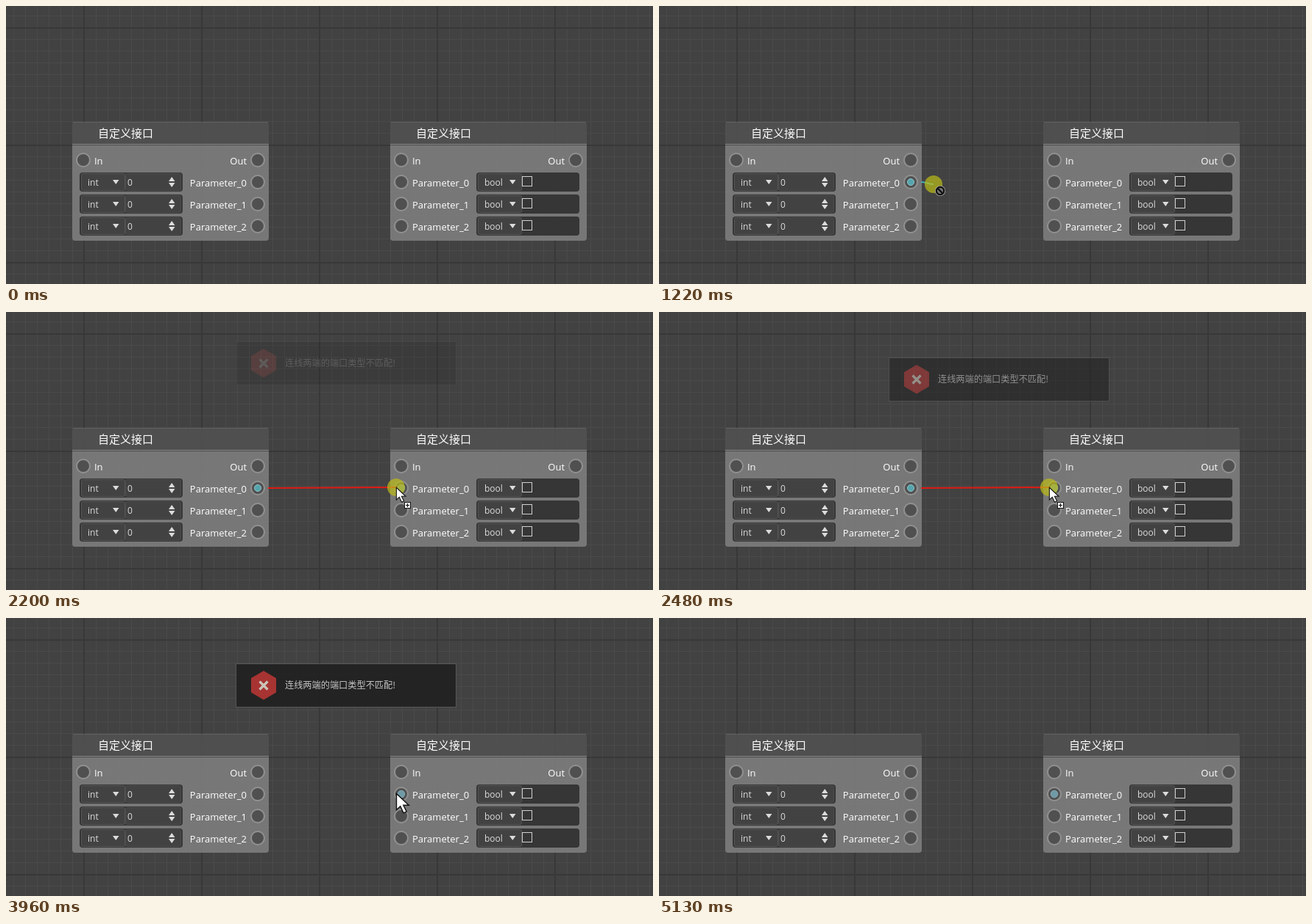
Write an HTML page that moves like this. It is 879 px wide and 379 px high and loops after 5.72 s.

```html
<!DOCTYPE html>
<html lang="zh">
<head>
<meta charset="utf-8">
<style>
html, body { margin: 0; width: 100%; height: 100%; overflow: hidden; background: #424242; }
svg { display: block; width: 879px; height: 379px; }
text { font-family: "Open Sans", "Noto Sans", "Noto Sans CJK SC", "Noto Sans CJK", sans-serif; font-size: 13px; fill: #fff; }
.cjk { font-family: "Noto Sans CJK SC", "Noto Sans CJK", sans-serif; }
.small { font-size: 12px; fill: #dcdcdc; }
</style>
</head>
<body>
<svg id="stage" viewBox="0 0 879 379" xmlns="http://www.w3.org/2000/svg"></svg>
<script>
const LOOP = 5720, STEP = 70;
const PRESS = 1010, MISMATCH = 2060, RELEASE = 2900, FADE = 3925, LEAVE = 4710;
const stage = document.getElementById('stage');

function add(parent, tag, attrs, text) {
  const el = document.createElementNS('http://www.w3.org/2000/svg', tag);
  for (const key in attrs) el.setAttribute(key, attrs[key]);
  if (text) el.textContent = text;
  parent.appendChild(el);
  return el;
}
const rect = (p, x, y, width, height, fill, more) => add(p, 'rect', { x, y, width, height, fill, ...more });
const path = (p, d, fill, more) => add(p, 'path', { d, fill, ...more });
const label = (p, x, y, s, more) => add(p, 'text', { x, y, ...more }, s);
const circle = (p, cx, cy, r, fill, more) => add(p, 'circle', { cx, cy, r, fill, ...more });
const show = (el, on) => el.setAttribute('visibility', on ? 'visible' : 'hidden');
const move = (el, x, y) => el.setAttribute('transform', `translate(${Math.round(x)} ${Math.round(y)})`);

function drawGrid() {
  rect(stage, 0, 0, 879, 379, '#424242');
  for (let x = 10; x < 879; x += 16) rect(stage, x, 0, 1, 379, '#4a4a4a');
  for (let y = 13; y < 379; y += 16) rect(stage, 0, y, 879, 1, '#4a4a4a');
  for (let x = 105; x < 879; x += 160) rect(stage, x, 0, 2, 379, '#383838');
  for (let y = 29; y < 379; y += 160) rect(stage, 0, y, 879, 2, '#383838');
}

function port(p, x, y) {
  circle(p, x, y, 9, '#505050', { stroke: '#919191', 'stroke-width': 2 });
}

function field(p, x, y, type) {
  rect(p, x, y, 140, 26, '#363636', { rx: 4 });
  rect(p, x + 2.5, y + 1.5, 59, 23, '#424242', { rx: 2, stroke: '#555' });
  label(p, x + 11, y + 18, type, { class: 'small' });
  path(p, `M${x + 45} ${y + 10}h8.5l-4.25 6z`, '#dcdcdc');
  if (type === 'int') {
    rect(p, x + 62.5, y + 1.5, 75, 23, '#424242', { rx: 2, stroke: '#4c4c4c' });
    label(p, x + 65, y + 18, '0', { class: 'small' });
    path(p, `M${x + 121} ${y + 12}h8.5l-4.25 -6zM${x + 121} ${y + 14}h8.5l-4.25 6z`, '#dcdcdc');
  } else {
    rect(p, x + 62.5, y + 5.5, 13, 13, 'none', { stroke: '#d0d0d0' });
  }
}

function drawNode(x, type) {
  const g = add(stage, 'g', { transform: `translate(${x} 158)` });
  const source = type === 'int';
  path(g, 'M0 30V4Q0 0 4 0H263Q267 0 267 4V30z', '#525252', { 'fill-opacity': .9 });
  rect(g, 1, 0, 265, 1, '#606060');
  path(g, 'M0 32H267V158Q267 162 263 162H4Q0 162 0 158z', '#7c7c7c', { 'fill-opacity': .92 });
  rect(g, 0, 30, 267, 1, '#8a8a8a');
  rect(g, 0, 31, 267, 1, '#4a4a4a');
  label(g, 35, 21, '自定义接口', { class: 'cjk', style: 'font-size:15px' });
  port(g, 15, 52);
  port(g, 252, 52);
  label(g, 30, 58, 'In');
  label(g, 237, 58, 'Out', { 'text-anchor': 'end' });
  for (let i = 0; i < 3; i++) {
    const y = 82 + 30 * i;
    port(g, source ? 252 : 15, y);
    label(g, source ? 237 : 30, y + 6, 'Parameter_' + i, { 'text-anchor': source ? 'end' : 'start' });
    field(g, source ? 10 : 117, y - 13, type);
  }
}

function makePopup() {
  const g = add(stage, 'g', {});
  rect(g, 312.5, .5, 299, 59, '#212121', { stroke: '#585858' });
  path(g, 'M350 10L367 20V39.5L350 49.5L333 39.5V20z', '#b03331');
  path(g, 'M344.5 24.5l11 11m0 -11l-11 11', 'none', { stroke: '#d6cfc4', 'stroke-width': 3.2 });
  label(g, 379, 34, '连线两端的端口类型不匹配!', { class: 'cjk', style: 'font-size:12.2px;fill:#d0d0d0' });
  return g;
}

function arrow(p, scale) {
  return path(p, 'M.5 .5V23.5L6 18.5L10.5 28L14.8 26L10.3 17H18z', '#fff',
    { stroke: '#111', 'stroke-width': 1.5, transform: `scale(${scale})` });
}

drawGrid();
drawNode(90, 'int');
drawNode(522, 'bool');

const litA = circle(stage, 342, 240, 4.5, '#55a5ae', { stroke: '#94c5ca' });
const litB = circle(stage, 537, 240, 4.8, '#6f9aa6', { stroke: '#86a9b3' });
const wire = path(stage, '', 'none', { 'stroke-width': 2 });
const popup = makePopup();
const pointer = add(stage, 'g', {});
const press = circle(pointer, 0, 0, 12, '#bcbc18', { 'fill-opacity': .7 });
const plain = arrow(pointer, .96);

const drop = add(pointer, 'g', {});
arrow(drop, .72);
rect(drop, 11.5, 20.5, 8, 8, '#fff', { stroke: '#111' });
path(drop, 'M13 24.5h5m-2.5 -2.5v5', 'none', { stroke: '#111', 'stroke-width': 1.2 });

const deny = add(pointer, 'g', {});
circle(deny, 9, 9, 7, '#d0d0d0');
circle(deny, 9, 9, 5.2, '#777', { stroke: '#111', 'stroke-width': 2.4 });
path(deny, 'M5.5 5.5l7 7', 'none', { stroke: '#111', 'stroke-width': 2.4 });

const progress = (t, from, to) => Math.min(1, Math.max(0, (t - from) / (to - from)));
const easeIn = p => u => u ** p;
const easeOut = p => u => 1 - (1 - u) ** p;

// pointer strokes: enter, pull away, cross the gap, settle on the port, leave
const strokes = [
  { from: 260, to: 750, dx: -43, dy: -122, ease: easeOut(3.2) },
  { from: PRESS, to: 1220, dx: 37, dy: 3, ease: easeIn(2) },
  { from: 1220, to: 1570, dx: 125, dy: -4, ease: easeOut(1.3) },
  { from: 1570, to: MISMATCH, dx: 32, dy: 0, ease: easeOut(1.65) },
  { from: LEAVE, to: 5060, dx: 49, dy: 123, ease: easeIn(1.9) }
];

function tip(t) {
  let x = 379, y = 362;
  for (const s of strokes) {
    const k = s.ease(progress(t, s.from, s.to));
    x += s.dx * k;
    y += s.dy * k;
  }
  return [x, y];
}

// the picture advances in 70 ms steps from the start of each burst
function snap(t) {
  const start = [4780, 3960, PRESS, 260, 0].find(s => t >= s);
  return start + Math.floor((t - start) / STEP) * STEP;
}

function render(now) {
  const t = snap(now % LOOP);
  const [x, y] = tip(t);
  const visible = t >= 260 && t < 5130;
  const drag = t >= PRESS && t < RELEASE;
  const overNode = x < 357 || x > 521;

  move(pointer, x, y);
  show(press, t >= PRESS && t < RELEASE + STEP);
  show(plain, visible && !drag);
  show(drop, drag && overNode);
  show(deny, drag && !overNode);

  show(litA, drag);
  show(litB, t >= MISMATCH);
  show(wire, drag && x > 357);
  const mid = (356 + x) / 2;
  wire.setAttribute('d', `M356 240C${mid} 240 ${mid} ${y} ${x} ${y}`);
  wire.setAttribute('stroke', t >= MISMATCH ? '#e01a12' : '#45b0b8');

  popup.setAttribute('opacity', progress(t, MISMATCH, 2830) - progress(t, FADE, 4380));
  move(popup, 0, 62 * easeOut(2.5)(progress(t, MISMATCH, 2480)));
}

const begin = performance.now();
function tick() {
  render(performance.now() - begin);
  requestAnimationFrame(tick);
}
tick();
</script>
</body>
</html>
```
